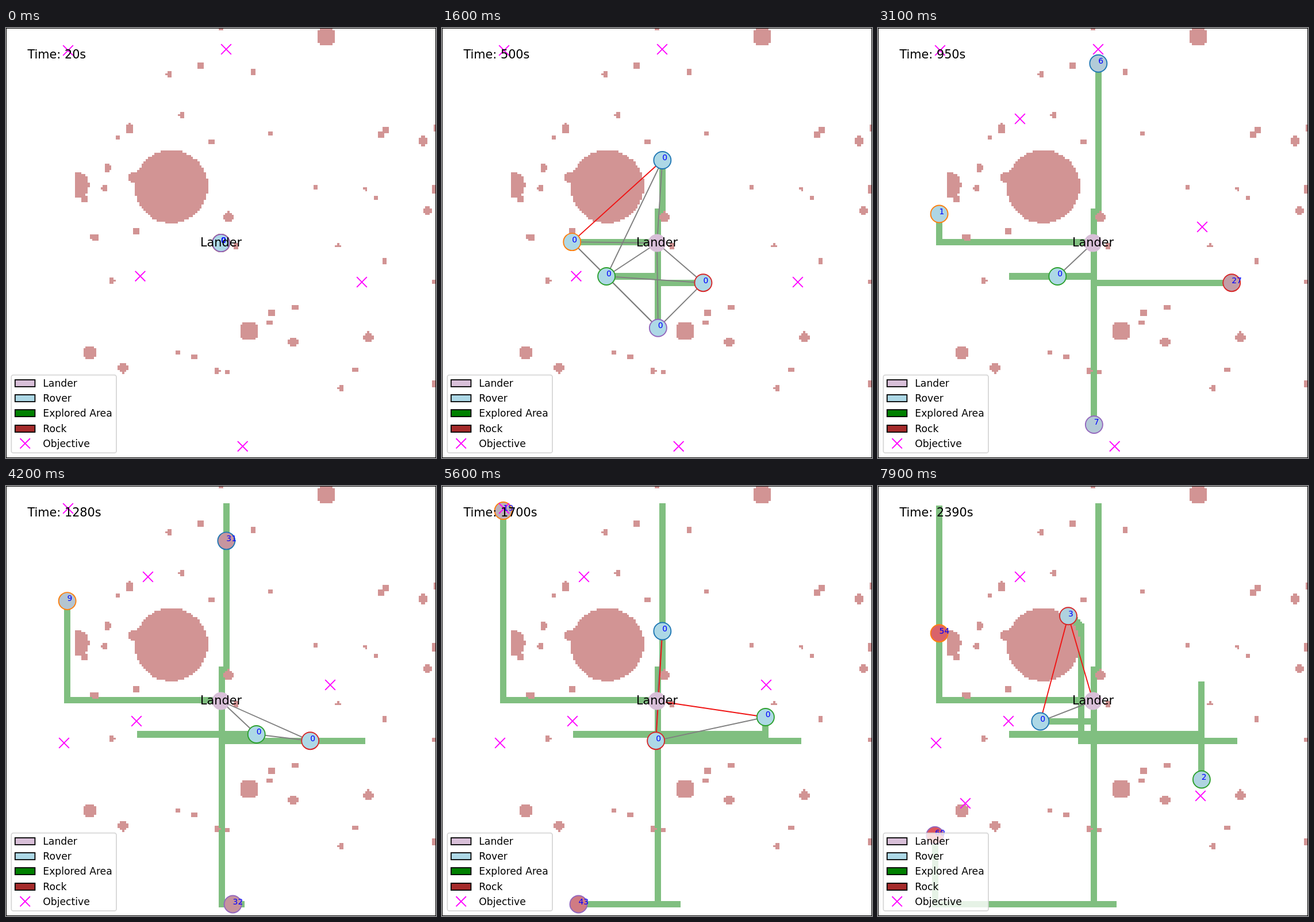
Recreate the animation shown at these times as an HTML page with a canvas. Size 748 by 748 pixels, loop 8 s.

```html
<!DOCTYPE html>
<html lang="en">
<head>
<meta charset="utf-8">
<title>Rover exploration</title>
<style>
  html, body { margin: 0; width: 100%; height: 100%; overflow: hidden; background: #fff; }
  canvas, svg { position: absolute; left: 0; top: 0; width: 748px; height: 748px; }
  text { font-family: "DejaVu Sans", sans-serif; fill: #000; }
  .big { font-size: 20.8px; }
  .key text { font-size: 17.2px; }
  .key rect { stroke: #000; stroke-width: 1.8px; }
</style>
</head>
<body>
<canvas id="map" width="748" height="748"></canvas>
<svg viewBox="0 0 748 748">
  <rect x=".5" y=".5" width="747" height="747" fill="none" stroke="#000"/>
  <text id="clock" class="big" x="37.4" y="53"></text>
  <text class="big" x="374" y="380" text-anchor="middle">Lander</text>
  <rect x="9.3" y="603.6" width="182.7" height="135.6" rx="3.5" fill="#fff" fill-opacity=".8" stroke="#ccc" stroke-opacity=".8" stroke-width="1.8"/>
  <g id="key" class="key"></g>
</svg>
<script>
const ctx = document.getElementById('map').getContext('2d');
const clock = document.getElementById('clock');
const CELL = 3.74, SIZE = 200, STEPS = 240;
const RANGE = 60, WAIT = 10, RATE = 0.246;
const LANDER = [99.5, 99.5];

// ---- legend ----
const entries = { Lander: '#d8bfd8', Rover: '#add8e6', 'Explored Area': '#008000', Rock: '#a52a2a', Objective: '' };
document.getElementById('key').innerHTML = Object.entries(entries).map(([name, color], i) => {
  const y = Math.round(612 + 26.2 * i);
  const mark = color
    ? `<rect x="15.8" y="${y}" width="34.6" height="12" fill="${color}"/>`
    : `<path d="M24.5 ${y - 3}l17.4 17.4m0-17.4l-17.4 17.4" stroke="#f0f" stroke-width="1.9"/>`;
  return `${mark}<text x="64.3" y="${y + 12}">${name}</text>`;
}).join('');

// ---- rocks: discs rounded to the grid ----
const rock = new Uint8Array(SIZE * SIZE);

function disc(r, cx, cy, left = 0) {
  for (let y = 0; y < SIZE; y++)
    for (let x = left; x < SIZE; x++)
      if (Math.hypot(x + .5 - cx, y + .5 - cy) <= r) rock[y * SIZE + x] = 1;
}

const scatter = (r, ...spots) => spots.forEach(([x, y]) => disc(r, x, y));

disc(17, 76.85, 73.8);
disc(6.4, 32.2, 73, 32);
scatter(4.5, [149, 4], [113, 141]);
scatter(3.4, [39, 151]);
scatter(2.33, [103.5, 87.8], [168.5, 143.8], [133.5, 146], [54.5, 158.2], [194, 52.5], [59.5, 69.5], [200, 75]);
scatter(1.7, [47.2, 65], [196, 85]);
scatter(1.45,
  [52, 51], [123, 49], [144, 74], [172, 79], [199, 118], [80, 151], [103, 160], [100, 0],
  [95.5, 53], [134.5, 130], [122.5, 137], [87.5, 153], [162.5, 159], [200.5, 46.5],
  [90.5, 17.5], [176.5, 47.5], [174.5, 49.5], [60.5, 94.5], [123.5, 132.5], [36.5, 79.5],
  [41.5, 97.5], [40, 97], [57.5, 45.9], [57.5, 47.5], [115, 20.5], [176, 108.5], [199, 165.5],
  [75.7, 21.5], [81.7, 40.5], [45.7, 74.5], [106.7, 101.5], [155.7, 167.5], [49.3, 117.5], [98.3, 159.5]);
scatter(1.05, [167.4, 74.6], [154.5, 101.2]);

// ---- rovers: corners of each route in cells, a third entry marks a sampling stop ----
const rovers = [
  { edge: '#1f77b4', load: 19, goals: [[383, 37], [227, 409]],
    route: [[100, 85], [102, 85], [102, 9, 1], [102, 85], [100, 85], [100, 109], [75, 109]] },
  { edge: '#ff7f0e', load: 20, goals: [[108, 39], [152, 552]],
    route: [[28, 99], [28, 10, 1], [28, 68]] },
  { edge: '#2ca02c', load: 20, goals: [[233.5, 431.7], [564, 346], [561, 539]],
    route: [[100, 115], [62, 115, 1], [150, 115], [150, 92, 1], [150, 136]] },
  { edge: '#d62728', load: 21, goals: [[619, 442], [247, 158]],
    route: [[100, 118], [165, 118, 1], [94, 118], [94, 69], [92, 64], [88, 60]] },
  { edge: '#9467bd', load: 20, goals: [[411.7, 727.7], [101, 447]],
    route: [[100, 194], [109, 194, 1], [26, 194], [26, 162]] }
];

// One cell per step along the longer remaining axis; sampling happens one cell early.
function trace(rover) {
  const path = Array(WAIT).fill(LANDER);
  let [x, y] = [100, 99];
  path.push([x, y]);
  rover.stops = [];
  for (const [tx, ty, sample] of rover.route) {
    while (x !== tx || y !== ty) {
      if (Math.abs(tx - x) > Math.abs(ty - y)) x += Math.sign(tx - x);
      else y += Math.sign(ty - y);
      path.push([x, y]);
      if (sample && Math.abs(tx - x) + Math.abs(ty - y) === 1) {
        rover.stops.push(path.length - 1);
        for (let i = 0; i < WAIT; i++) path.push([x, y]);
      }
    }
  }
  rover.path = path;
  rover.counts = [];
}

// True when a sight line runs through rock for about one cell or more.
function blocked([ax, ay], [bx, by]) {
  const n = Math.ceil(Math.hypot(bx - ax, by - ay) * 10);
  let hits = 0;
  for (let i = 0; i < n; i++) {
    const f = (i + .5) / n;
    const x = Math.floor(ax + .5 + (bx - ax) * f), y = Math.floor(ay + .5 + (by - ay) * f);
    hits += rock[y * SIZE + x];
  }
  return hits > 8.5;
}

// Links between all nodes in range; the last node is the lander.
function findLinks(step) {
  const nodes = [...rovers.map(r => r.path[step]), LANDER], links = [];
  nodes.forEach((a, i) => nodes.slice(i + 1).forEach((b, j) => {
    if (Math.hypot(a[0] - b[0], a[1] - b[1]) <= RANGE)
      links.push({ a, b, i, j: i + 1 + j, bad: blocked(a, b) });
  }));
  return links;
}

function reachable(links) {
  const seen = new Set([rovers.length]);
  for (let pass = 0; pass < rovers.length; pass++)
    for (const { i, j, bad } of links)
      if (!bad && (seen.has(i) || seen.has(j))) seen.add(i).add(j);
  return seen;
}

// A rover's count grows while it is cut off and clears when it is back in contact.
rovers.forEach(trace);
const linksAt = [];
for (let s = 0; s < STEPS; s++) {
  const links = linksAt[s] = findLinks(s), online = reachable(links);
  rovers.forEach((r, i) => {
    if (online.has(i)) r.idle = r.cargo = 0;
    else {
      if (r.stops.includes(s - 1)) r.cargo += r.load;
      if (!r.stops.some(a => s > a && s <= a + WAIT)) r.idle++;
    }
    r.counts[s] = Math.ceil(r.idle * RATE) + r.cargo;
  });
}

// ---- drawing ----
const mid = c => (c + .5) * CELL;

function fillCells(c, x, y, size) {
  const l = Math.round(x * CELL), t = Math.round(y * CELL);
  c.fillRect(l, t, Math.round((x + size) * CELL) - l, Math.round((y + size) * CELL) - t);
}

const rockLayer = document.createElement('canvas');
rockLayer.width = rockLayer.height = 748;
const rockCtx = rockLayer.getContext('2d');
rockCtx.fillStyle = '#d29494';
rock.forEach((on, i) => on && fillCells(rockCtx, i % SIZE, Math.floor(i / SIZE), 1));

function circle(x, y, r, fill, edge) {
  ctx.beginPath();
  ctx.arc(x, y, r, 0, 7);
  ctx.fillStyle = fill;
  ctx.fill();
  if (edge) {
    ctx.strokeStyle = edge;
    ctx.stroke();
  }
}

function line(x1, y1, x2, y2, color) {
  ctx.strokeStyle = color;
  ctx.beginPath();
  ctx.moveTo(x1, y1);
  ctx.lineTo(x2, y2);
  ctx.stroke();
}

// Light blue turning red as the count nears 100.
function heat(n) {
  const f = Math.min(n / 100, 1), mix = (a, b) => Math.round(a + (b - a) * f);
  return `rgb(${mix(173, 255)},${mix(216, 0)},${mix(230, 0)})`;
}

function draw(frame) {
  const s = 2 + 3 * frame;
  ctx.fillStyle = '#fff';
  ctx.fillRect(0, 0, 748, 748);
  ctx.lineWidth = 1.9;

  ctx.fillStyle = '#80bf80';
  for (const r of rovers)
    for (let i = WAIT; i <= s; i++) fillCells(ctx, r.path[i][0] - 1, r.path[i][1] - 1, 3);
  ctx.drawImage(rockLayer, 0, 0);

  for (const bad of [false, true])
    for (const l of linksAt[s])
      if (l.bad === bad)
        line(mid(l.a[0]), mid(l.a[1]), mid(l.b[0]), mid(l.b[1]), bad ? '#f01414' : '#808080');

  circle(374, 374, 15.5, '#d8bfd8');
  for (const r of rovers) {
    const [x, y] = r.path[s];
    circle(mid(x), mid(y), 15, heat(r.counts[s]), r.edge);
  }

  for (const r of rovers) {
    const [x, y] = r.goals[r.stops.filter(a => a < s).length];
    line(x - 8.8, y - 8.8, x + 8.8, y + 8.8, '#f0f');
    line(x - 8.8, y + 8.8, x + 8.8, y - 8.8, '#f0f');
  }

  ctx.font = '13.9px "DejaVu Sans", sans-serif';
  ctx.fillStyle = '#00f';
  for (const r of rovers) ctx.fillText(r.counts[s], mid(r.path[s][0]), mid(r.path[s][1]) + .4);
  clock.textContent = `Time: ${s * 10}s`;
}

const start = performance.now();
let shown = -1;
function tick() {
  const frame = Math.floor((performance.now() - start) % 8000 / 100);
  if (frame !== shown) draw(shown = frame);
  requestAnimationFrame(tick);
}
tick();
</script>
</body>
</html>
```
